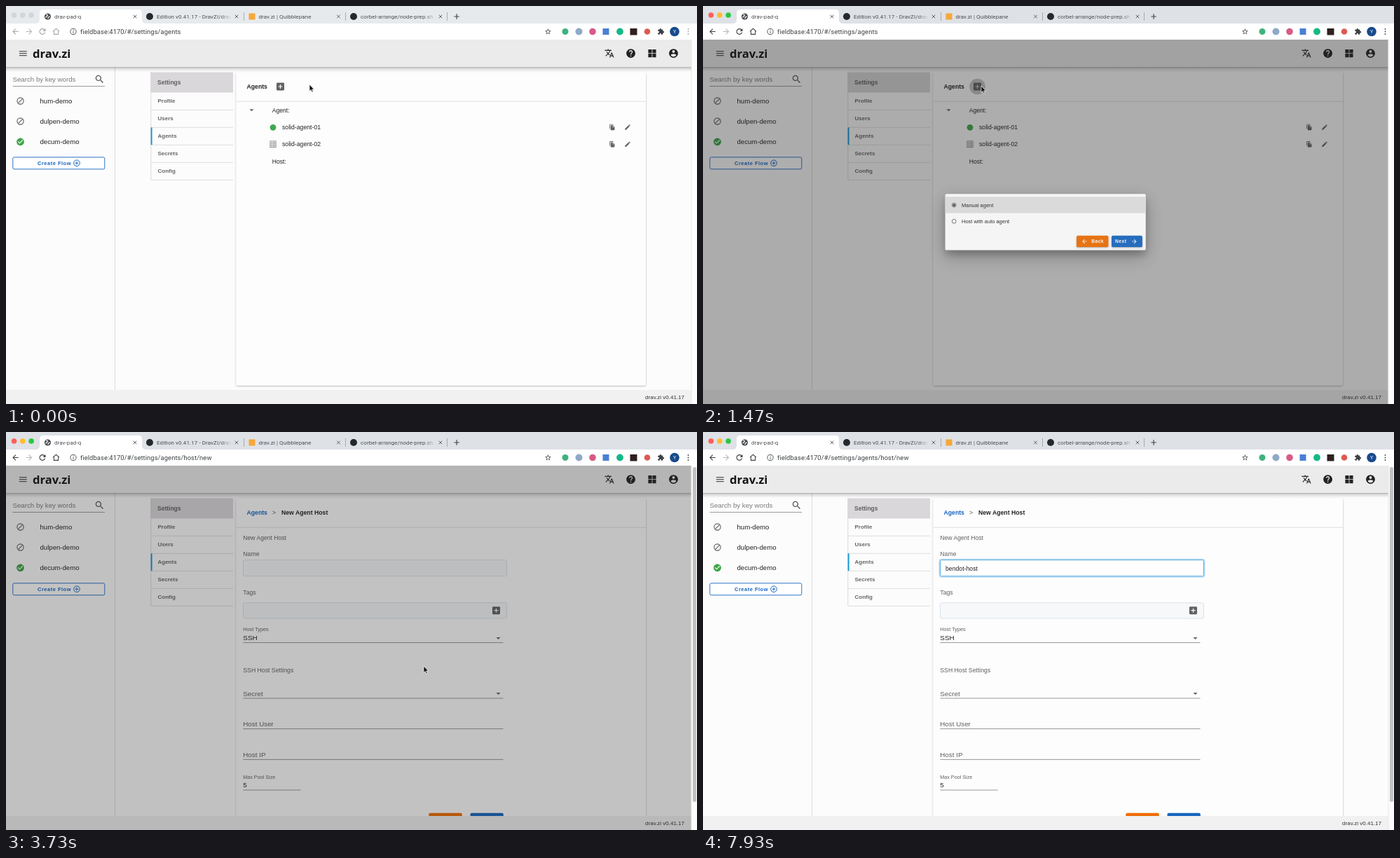
An HTML page that plays this animation: 986 by 568 pixels, repeating every 8000 ms.

```html
<!DOCTYPE html>
<html lang="en">
<head>
<meta charset="utf-8">
<title>Agent host setup</title>
<style>
html, body { margin: 0; width: 100%; height: 100%; overflow: hidden; background: #fff; }
svg { display: block; width: 986px; height: 568px; font-family: "Liberation Sans", Arial, sans-serif; }
.ui { font-family: Roboto, "Open Sans", sans-serif; }
text { white-space: pre; }
</style>
</head>
<body>
<svg id="stage" viewBox="0 0 986 568" xmlns="http://www.w3.org/2000/svg"></svg>
<script>
const LOOP = 8000;
const FOCUS = 420, OPEN = 1351, PICK = 2480, NAV = 3685, FIELD = 4480, TYPE = 5600, KEY = 170;
const HOST = 'bendot-host';
const INK = '#222', GREY = '#616161', BLUE = '#1565c0', ORANGE = '#ef6c00';

// Icon outlines on a 24 unit grid
const DISC = 'M12 2C6.48 2 2 6.48 2 12s4.48 10 10 10 10-4.48 10-10S17.52 2 12 2z';
const ICONS = {
  translate: 'M12.87 15.07l-2.54-2.51.03-.03c1.74-1.94 2.98-4.17 3.71-6.53H17V4h-7V2H8v2H1v1.99h11.17C11.5 7.92 10.44 9.75 9 11.35 8.07 10.32 7.3 9.19 6.69 8h-2c.73 1.63 1.73 3.17 2.98 4.56l-5.09 5.02L4 19l5-5 3.11 3.11.76-2.04zM18.5 10h-2L12 22h2l1.12-3h4.75L21 22h2l-4.5-12zm-2.62 7l1.62-4.33L19.12 17h-3.24z',
  help: DISC + 'm1 17h-2v-2h2v2zm2.07-7.75l-.9.92C13.45 12.9 13 13.5 13 15h-2v-.5c0-1.1.45-2.1 1.17-2.83l1.24-1.26c.37-.36.59-.86.59-1.41 0-1.1-.9-2-2-2s-2 .9-2 2H8c0-2.21 1.79-4 4-4s4 1.79 4 4c0 .88-.36 1.68-.93 2.25z',
  account: DISC + 'm0 3c1.66 0 3 1.34 3 3s-1.34 3-3 3-3-1.34-3-3 1.34-3 3-3zm0 14.2c-2.5 0-4.71-1.28-6-3.22.03-1.99 4-3.08 6-3.08 1.99 0 5.97 1.09 6 3.08-1.29 1.94-3.5 3.22-6 3.22z',
  check: DISC + 'm-2 15l-5-5 1.41-1.41L10 14.17l7.59-7.59L19 8l-9 9z',
  search: 'M15.5 14h-.79l-.28-.27C15.41 12.59 16 11.11 16 9.5 16 5.91 13.09 3 9.5 3S3 5.91 3 9.5 5.91 16 9.5 16c1.61 0 3.09-.59 4.23-1.57l.27.28v.79l5 4.99L20.49 19l-4.99-5zm-6 0C7.01 14 5 11.99 5 9.5S7.01 5 9.5 5 14 7.01 14 9.5 11.99 14 9.5 14z',
  pencil: 'M3 17.25V21h3.75L17.81 9.94l-3.75-3.75L3 17.25zM20.71 7.04c.39-.39.39-1.02 0-1.41l-2.34-2.34c-.39-.39-1.02-.39-1.41 0l-1.83 1.83 3.75 3.75 1.83-1.83z',
  copy: 'M16 1H4c-1.1 0-2 .9-2 2v14h2V3h12V1zm-1 4l6 6v10c0 1.1-.9 2-2 2H7.99C6.89 23 6 22.1 6 21V7c0-1.1.89-2 1.99-2H15zm-1 7h5.5L14 6.5V12z',
  add: 'M19 3H5c-1.11 0-2 .9-2 2v14c0 1.1.89 2 2 2h14c1.1 0 2-.9 2-2V5c0-1.1-.9-2-2-2zm-2 10h-4v4h-2v-4H7v-2h4V7h2v4h4v2z',
  reload: 'M17.65 6.35C16.2 4.9 14.21 4 12 4c-4.42 0-7.99 3.58-7.99 8s3.57 8 7.99 8c3.73 0 6.84-2.55 7.73-6h-2.08c-.82 2.33-3.04 4-5.65 4-3.31 0-6-2.69-6-6s2.69-6 6-6c1.66 0 3.14.69 4.22 1.78L13 11h7V4l-2.35 2.35z',
  back: 'M20 11H7.83l5.59-5.59L12 4l-8 8 8 8 1.41-1.41L7.83 13H20v-2z',
  next: 'M12 4l-1.41 1.41L16.17 11H4v2h12.17l-5.58 5.59L12 20l8-8z',
  star: 'M22 9.24l-7.19-.62L12 2 9.19 8.63 2 9.24l5.46 4.73L5.82 21 12 17.27 18.18 21l-1.63-7.03L22 9.24zM12 15.4l-3.76 2.27 1-4.28-3.32-2.88 4.38-.38L12 6.1l1.71 4.04 4.38.38-3.32 2.88 1 4.28L12 15.4z',
  puzzle: 'M20.5 11H19V7c0-1.1-.9-2-2-2h-4V3.5C13 2.12 11.88 1 10.5 1S8 2.12 8 3.5V5H4c-1.1 0-1.99.9-1.99 2v3.8H3.5c1.49 0 2.7 1.21 2.7 2.7s-1.21 2.7-2.7 2.7H2V20c0 1.1.9 2 2 2h3.8v-1.5c0-1.49 1.21-2.7 2.7-2.7 1.49 0 2.7 1.21 2.7 2.7V22H17c1.1 0 2-.9 2-2v-4h1.5c1.38 0 2.5-1.12 2.5-2.5S21.88 11 20.5 11z',
  home: 'M12 3L2 12h3v9h14v-9h3zM12 5.8l5 4.5V19H7v-8.7z',
  grid: 'M3 3h8.3v8.3H3zM12.7 3H21v8.3h-8.3zM3 12.7h8.3V21H3zM12.7 12.7H21V21h-8.3z',
  menu: 'M3 6h18v2H3zM3 11h18v2H3zM3 16h18v2H3z'
};

const rect = (x, y, w, h, fill, more = '') => `<rect x="${x}" y="${y}" width="${w}" height="${h}" fill="${fill}" ${more}/>`;
const dot = (x, y, r, fill, more = '') => `<circle cx="${x}" cy="${y}" r="${r}" fill="${fill}" ${more}/>`;
const line = (d, stroke, w = 1, more = '') => `<path d="${d}" fill="none" stroke="${stroke}" stroke-width="${w}" ${more}/>`;
const text = (x, y, s, size, fill = INK, more = '') => `<text x="${x}" y="${y}" font-size="${size}" fill="${fill}" ${more}>${s}</text>`;
const bold = (x, y, s, size, fill, more = '') => text(x, y, s, size, fill, 'font-weight="700" ' + more);
const icon = (name, x, y, k, fill = INK) =>
  `<path transform="translate(${x - 12 * k} ${y - 12 * k}) scale(${k})" fill="${fill}" fill-rule="evenodd" d="${ICONS[name]}"/>`;
const caretDown = (x, y) => `<path d="M${x - 3} ${y - 1.5}h6l-3 3z" fill="${GREY}"/>`;
const fade = (id, x) => `<linearGradient id="${id}" gradientUnits="userSpaceOnUse" x1="${x - 16}" x2="${x}" y1="0" y2="0">
  <stop stop-color="#4a4d51"/><stop offset="1" stop-color="#4a4d51" stop-opacity="0"/></linearGradient>`;

const defs = `<defs>
  ${fade('fadeA', 322)}${fade('fadeB', 613)}
  <linearGradient id="drop" x2="0" y2="1"><stop stop-opacity=".3"/><stop offset=".35" stop-opacity=".12"/><stop offset="1" stop-opacity="0"/></linearGradient>
  <filter id="card" x="-5%" y="-5%" width="110%" height="110%"><feDropShadow dx="0" dy="1" stdDeviation="1" flood-opacity=".32"/></filter>
  <filter id="lift" x="-30%" y="-80%" width="160%" height="300%">
    <feDropShadow dx="0" dy="7" stdDeviation="5" flood-opacity=".2"/>
    <feDropShadow dx="0" dy="8" stdDeviation="13" flood-opacity=".3"/></filter>
  <filter id="raise" x="-20%" y="-30%" width="140%" height="180%"><feDropShadow dx="0" dy="1" stdDeviation="1" flood-opacity=".35"/></filter>
</defs>`;

const tabText = (x, s, fill = '#4a4d51') => text(x, 18, s, 8, fill, 'class="ui" letter-spacing=".08"');
const cross = x => line(`M${x - 2.3} 12.7l4.6 4.6m0-4.6l-4.6 4.6`, '#55585c', .9);

function chrome() {
  const lights = ['#fe5f57', '#febc2e', '#28c840'].map((c, i) =>
    dot(11.5 + 12.3 * i, 13, 3.8, c, `class="light" data-on="${c}"`)).join('');
  return rect(0, 0, 986, 26, '#dee1e6', 'id="strip"') + lights +
    '<path d="M42 25q6 0 6-6v-9q0-5 5-5h136q5 0 5 5v9q0 6 6 6z" fill="#fff"/>' +
    rect(0, 25, 986, 23, '#fff') +
    dot(59.5, 15, 4.6, '#4a4d51') + line('M57 12q3 0 2 2t-3 2M60 18q0-3 3-3', '#fff', 1.2) +
    tabText(69, 'drav-pad-q') + cross(184) +
    dot(205, 15, 5, '#24292e') + tabText(215, 'Edition v0.41.17 - DravZI/drav', 'url(#fadeA)') + cross(329) +
    rect(346.5, 10.5, 9, 9, '#f5a83a') + tabText(360.5, 'drav.zi | Quibblepane') + cross(474.5) +
    dot(496, 15, 5, '#24292e') + tabText(506, 'corbel-arrange/node-prep.sh at main', 'url(#fadeB)') + cross(620) +
    line('M339.5 9v12M484.5 9v12M629.5 9v12', '#9a9da2', .8) +
    line('M639.3 15h7.6M643.1 11.2v7.6', '#44474b', 1.2) +
    '<g class="nav">' + icon('back', 13.5, 36.5, .53, 'currentColor') + icon('reload', 52, 36.5, .56, 'currentColor') +
    icon('home', 71.5, 36.2, .52, 'currentColor') + '</g>' + icon('next', 33, 36.5, .53, '#b4b6b9') +
    dot(96, 36.5, 4.1, 'none', 'stroke="#55585c"') + rect(95.5, 36, 1, 2.8, '#55585c') + rect(95.5, 34, 1, 1.1, '#55585c') +
    text(106, 40, '', 9.4, '#3c4043', 'id="url" class="ui" letter-spacing=".08"') +
    icon('star', 773.5, 36.5, .44, '#44474b') +
    dot(798, 36.5, 4.5, '#3fb27f') + dot(817.5, 36.5, 5, '#8fa9c6') + dot(837, 36.5, 4.8, '#d95a86') +
    rect(851.5, 32, 9, 9, '#4a7fd6') + dot(876, 36.5, 4.9, '#15b886') + rect(890.5, 32, 10, 9.5, '#30201f') +
    dot(915, 36.5, 4.3, '#dc5a50') + icon('puzzle', 934.5, 36.5, .42, '#3c4043') +
    dot(954, 36.5, 6.8, '#174a8c') + text(954, 39, 'Y', 7, '#fff', 'class="ui" text-anchor="middle"') +
    '<g class="nav" fill="currentColor">' + [33, 36.5, 40].map(y => dot(973.5, y, .9, 'currentColor')).join('') + '</g>';
}

function sidebar() {
  const ban = y => dot(20.5, y, 4.6, 'none', 'stroke="#5c5c5c" stroke-width="1.1"') + line(`M17.3 ${y + 3.2}l6.4-6.4`, '#5c5c5c', 1.1);
  return rect(0, 87, 155, 461, '#fdfcfd') + line('M155.5 87v461', '#dcdcdc') +
    text(9.5, 107.7, 'Search by key words', 9.7, '#7b7b7b') + icon('search', 133.5, 104.5, .64, '#555') +
    line('M9.5 114.5h131.5', '#9b9b9b') +
    ban(135.5) + text(48.5, 139, 'hum-demo', 9.6) +
    ban(164.5) + text(48.5, 168, 'dulpen-demo', 9.6) +
    icon('check', 20.5, 193.8, .54, '#3fa648') + text(48.5, 197, 'decum-demo', 9.6) +
    rect(9.8, 215.8, 131, 17, '#fff', `rx="2" stroke="${BLUE}" stroke-width=".9"`) +
    bold(45, 227, 'Create Flow', 7.5, BLUE, 'letter-spacing=".5"') +
    dot(101, 224.2, 4.3, 'none', `stroke="${BLUE}"`) + line('M98.7 224.2h4.6M101 221.9v4.6', BLUE);
}

function settings() {
  const items = ['Profile', 'Users', 'Agents', 'Secrets', 'Config'].map((s, i) =>
    bold(216.5, 138.3 + 25 * i, s, 8, '#666') + line(`M207 ${148.3 + 25 * i}h117`, '#dedede')).join('');
  return rect(206.5, 94.5, 117.5, 29, '#d9d7d9') + bold(216, 112, 'Settings', 8.5, '#606060') +
    items + line('M206.8 94v154', '#d4d4d4', .8) + rect(206.6, 173.3, 2, 24.8, '#1b9ad6');
}

function listPage() {
  const tools = y => icon('copy', 865, y, .38, GREY) + icon('pencil', 887, y, .42, GREY);
  const rack = [193.2, 196, 198.8].map(y => line(`M377 ${y + 2.4}h8M378.4 ${y + .9}h1.6M381 ${y + .9}h3`, '#8a8a8a', .8)).join('');
  return '<g id="list">' + rect(328.5, 94.5, 584.5, 447, '#fefdfe', 'rx="2" filter="url(#card)"') +
    line('M329 136.2h584', '#dedede') + bold(343.5, 118, 'Agents', 8.7) +
    dot(391.5, 115, 11.3, '#000', 'id="halo"') + icon('add', 391.5, 115, .61, GREY) +
    caretDown(350.5, 148.7) + text(379.7, 151.5, 'Agent:', 8.65) +
    dot(381, 173.3, 4.4, '#3fa950') + text(394, 176, 'solid-agent-01', 8.7) + tools(173) +
    rect(376.8, 192.8, 8.4, 9, 'none', 'stroke="#8a8a8a" stroke-width=".8"') + rack +
    text(394, 200.2, 'solid-agent-02', 8.7) + tools(197.3) +
    text(379.7, 224.6, 'Host:', 8.65) + '</g>';
}

function formPage() {
  const rule = (y, x = 709.5) => line(`M338.3 ${y}H${x}`, '#8d8d8d', .9);
  return '<g id="form">' + rect(328.5, 94.5, 584.5, 490, '#fefdfe', 'rx="2" filter="url(#card)"') +
    line('M329 136.2h584', '#dedede') + bold(343.5, 118, 'Agents', 8.7, BLUE) +
    text(380, 118, '&gt;', 8.7, '#555') + bold(393, 118, 'New Agent Host', 8.7) +
    text(338.3, 153.5, 'New Agent Host', 8.6, GREY) + text(338.3, 177, 'Name', 8.7, GREY) +
    rect(337.3, 181.5, 378.4, 25.5, 'none', 'id="glow" rx="3" stroke="#b9dcf3" stroke-width="1.6"') +
    rect(338.5, 182.7, 376, 23, '#f6f8fa', 'id="field" rx="2" stroke="#dde2e8"') +
    text(346, 198, '', 8.7, INK, 'id="typed"') + rect(346.6, 189.5, .9, 10, '#333', 'id="caret"') +
    text(338.3, 232, 'Tags', 8.7, GREY) +
    rect(338.5, 243.7, 376, 22.3, '#f6f8fa', 'rx="2" stroke="#dde2e8"') + icon('add', 699.5, 254.7, .61, GREY) +
    text(338.3, 284, 'Host Types', 7.3, GREY) + text(338.3, 296.8, 'SSH', 9.9) + caretDown(702.5, 294.5) + rule(300.6) +
    text(338.3, 343.2, 'SSH Host Settings', 8.7, GREY) +
    text(338.3, 376.6, 'Secret', 9.8, GREY) + caretDown(702.5, 373.5) + rule(380) +
    text(338.3, 420.4, 'Host User', 9.8, GREY) + rule(423.6) +
    text(338.3, 464.2, 'Host IP', 9.8, GREY) + rule(467.4) +
    text(338.3, 494.6, 'Max Pool Size', 7.2, GREY) + text(338.3, 507, '5', 9.9) + rule(511, 420.5) +
    rect(603.3, 543.8, 47.5, 17, ORANGE, 'rx="2"') + rect(662.5, 543.8, 47.3, 17, BLUE, 'rx="2"') + '</g>';
}

function dialog() {
  const option = (y, s) => dot(350, y, 3.1, 'none', 'stroke="#555" stroke-width=".9"') + text(361.5, y + 2.9, s, 7.95);
  const label = (x, s) => bold(x, 340.2, s, 7.2, '#fff', 'letter-spacing=".45"');
  return '<g id="dialog">' + rect(336.7, 265.8, 304, 85, '#fff', 'rx="2" filter="url(#lift)"') +
    rect(336.7, 270, 304, 24.7, '#e0e0e0', 'id="row"') + option(282.6, 'Manual agent') + option(307.2, 'Host with auto agent') +
    dot(350, 282.6, 1.8, '#333', 'id="bullet"') +
    rect(535.8, 329, 48.3, 17.3, ORANGE, 'rx="2" filter="url(#raise)"') + icon('back', 548, 337.7, .43, '#fff') + label(558.3, 'Back') +
    rect(589, 329, 46.6, 17.3, BLUE, 'rx="2" filter="url(#raise)"') + label(594.3, 'Next') + icon('next', 623.3, 337.7, .43, '#fff') + '</g>';
}

const header = rect(0, 48, 978, 39, '#ebebeb') + rect(0, 87, 978, 7, 'url(#drop)') + icon('menu', 24.3, 67.7, .6, '#555') +
  bold(38, 74.3, 'drav.zi', 16.6, '#141414', 'style="font-family:\'Open Sans\',\'Noto Sans\',sans-serif"') +
  icon('translate', 861, 67.6, .6) + icon('help', 891.6, 67.6, .64) + icon('grid', 922, 67.6, .62) + icon('account', 952.5, 67.6, .64);
const footer = rect(0, 548, 978, 20, '#f1f1f1') + text(968, 561, 'drav.zi v0.41.17', 8, '#333', 'text-anchor="end"');
const scrollbar = rect(978, 48, 8, 520, '#fcfcfc') + line('M978 48v520', '#e4e4e4', .8) +
  rect(980, 50, 5, 478, '#c1c1c1', 'id="thumb" rx="2.5"');
const pointer = '<path id="arrow" d="M0 0v9.6l2.1-2 1.5 3.4 1.6-.7-1.5-3.3h2.9z" fill="#111" stroke="#fff" stroke-width=".7"/>' +
  '<g id="beam">' + line('M-2.4-4.6q2.4 0 2.4 1.4v6.4q0 1.4-2.4 1.4M2.4-4.6q-2.4 0-2.4 1.4M2.4 4.6q-2.4 0-2.4-1.4M-1.3 1.6h2.6', '#222', .9) + '</g>';

const stage = document.getElementById('stage');
stage.innerHTML = defs + rect(0, 0, 986, 568, '#fdfcfd') + sidebar() + settings() + listPage() + formPage() + header + footer +
  rect(0, 48, 977.6, 520, '#212121', 'id="shade"') + dialog() + scrollbar + chrome() + pointer;

const el = {};
stage.querySelectorAll('[id]').forEach(n => el[n.id] = n);
const lights = stage.querySelectorAll('.light'), navs = stage.querySelectorAll('.nav');
const set = (n, attrs) => { for (const k in attrs) n.setAttribute(k, attrs[k]); };
const show = (n, on) => n.setAttribute('visibility', on ? 'visible' : 'hidden');
const clamp = v => Math.min(1, Math.max(0, v));
const smooth = v => v * v * (3 - 2 * v);

function bezier(x1, y1, x2, y2) {
  const at = (a, b, s) => 3 * (1 - s) ** 2 * s * a + 3 * (1 - s) * s * s * b + s ** 3;
  return x => {
    let lo = 0, hi = 1;
    for (let i = 0; i < 24; i++) {
      const mid = (lo + hi) / 2;
      if (at(x1, x2, mid) < x) lo = mid; else hi = mid;
    }
    return at(y1, y2, hi);
  };
}
const popEase = bezier(.25, .8, .25, 1), shadeEase = bezier(.25, .8, .5, 1);

// Pointer stops: time, x, y
const PATH = [[0, 433, 112], [400, 433, 112], [1050, 397, 114], [1720, 397, 114], [2380, 396, 302],
  [2620, 396, 302], [3000, 491, 327], [3420, 596, 334], [3900, 596, 334], [4420, 453, 199]];

function pointerAt(t) {
  const i = PATH.findIndex(p => p[0] > t);
  if (i < 0) return PATH[PATH.length - 1].slice(1);
  const [t0, x0, y0] = PATH[i - 1], [t1, x1, y1] = PATH[i];
  const k = smooth((t - t0) / (t1 - t0));
  return [x0 + (x1 - x0) * k, y0 + (y1 - y0) * k];
}

function update(t) {
  const active = t >= FOCUS, formOn = t >= NAV, picked = t >= PICK, focused = t >= FIELD;

  set(el.strip, { fill: active ? '#dee1e6' : '#e7eaed' });
  lights.forEach(n => set(n, { fill: active ? n.dataset.on : '#d3d5d8' }));
  navs.forEach(n => set(n, { color: active ? '#3c4043' : '#a3a6aa' }));
  el.url.textContent = 'fieldbase:4170/#/settings/agents' + (formOn ? '/host/new' : '');

  show(el.list, !formOn);
  set(el.form, { display: formOn ? 'inline' : 'none' });
  show(el.thumb, formOn);

  const hover = clamp((t - 930) / 200) * (1 - clamp((t - 1760) / 200));
  set(el.halo, { opacity: hover * (.13 + .09 * clamp((t - OPEN) / 100)) });

  const pop = t < OPEN || formOn ? 0 : popEase(clamp((t - OPEN) / 300));
  const scale = .5 + pop / 2;
  set(el.dialog, {
    opacity: pop, display: pop ? 'inline' : 'none',
    transform: `translate(488.7 308.3) scale(${scale}) translate(-488.7 -308.3)`
  });
  set(el.row, { y: picked ? 294.8 : 270 });
  set(el.bullet, { cy: picked ? 307.2 : 282.6 });
  set(el.shade, { opacity: .46 * (shadeEase(clamp((t - OPEN) / 300)) - shadeEase(clamp((t - NAV) / 300))) });

  set(el.field, { fill: focused ? '#fff' : '#f6f8fa', stroke: focused ? '#56a9de' : '#dde2e8' });
  show(el.glow, formOn && focused);
  const typed = t < TYPE ? 0 : Math.min(HOST.length, 1 + Math.floor((t - TYPE) / KEY));
  el.typed.textContent = HOST.slice(0, typed);
  const lastKey = typed ? TYPE + (typed - 1) * KEY : FIELD;
  set(el.caret, {
    x: 346.6 + (typed ? el.typed.getComputedTextLength() : 0),
    opacity: focused && (t - lastKey) % 1000 < 500 ? 1 : 0
  });

  const [x, y] = pointerAt(t);
  const overField = formOn && y > 182 && y < 206;
  show(el.arrow, !overField);
  show(el.beam, overField && t < TYPE);
  [el.arrow, el.beam].forEach(n => set(n, { transform: `translate(${x} ${y})` }));
}

const start = performance.now();
function tick() {
  update((performance.now() - start) % LOOP);
  requestAnimationFrame(tick);
}
tick();
</script>
</body>
</html>
```
